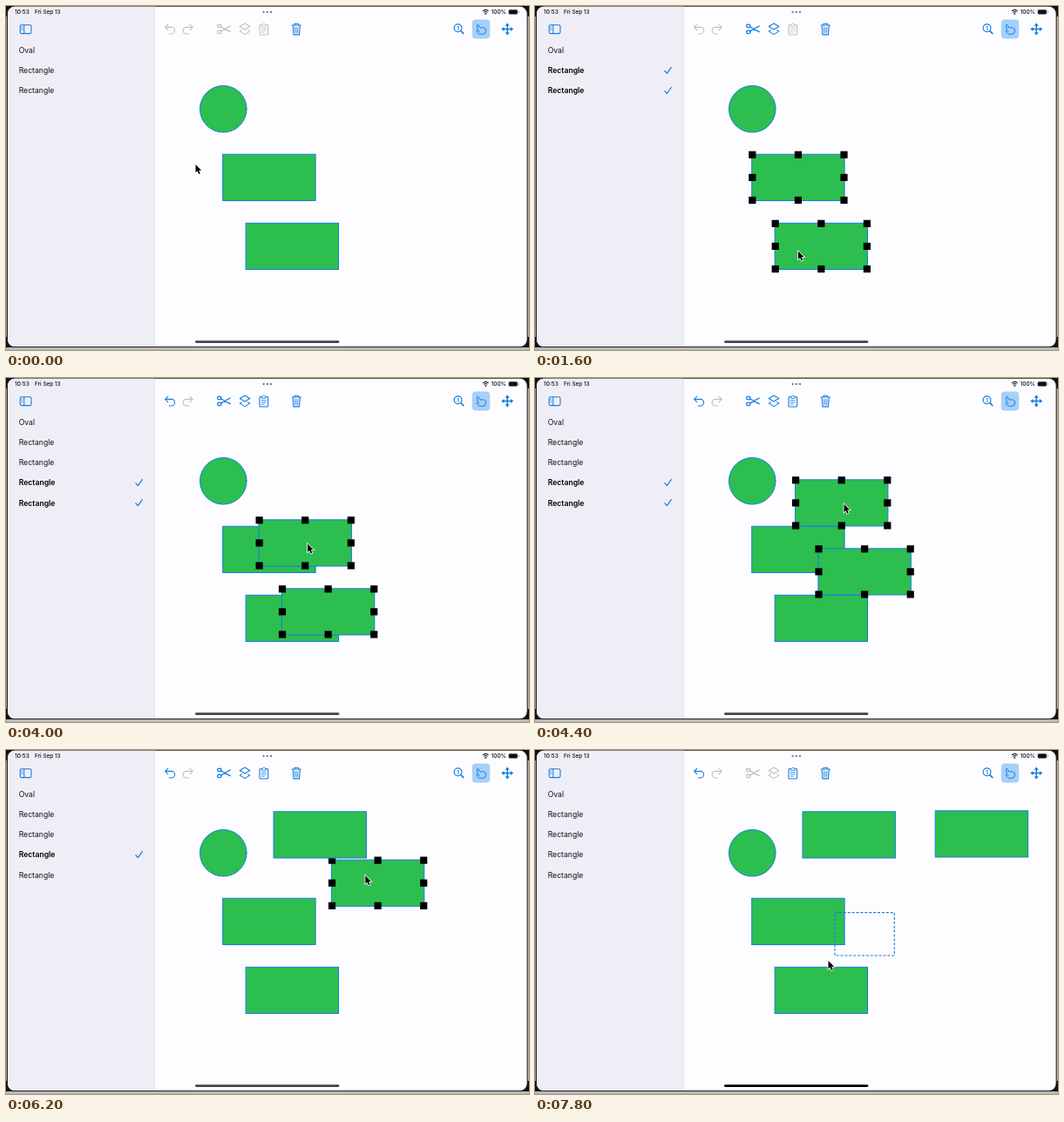
An HTML page with a canvas that plays this animation: 600 px wide and 395 px high, repeating every 8000 ms.

```html
<!DOCTYPE html>
<html lang="en">
<head>
<meta charset="utf-8">
<title>Shape editor</title>
<style>
html, body { margin: 0; width: 100%; height: 100%; overflow: hidden; background: #b9b9bb; }
canvas { display: block; width: 600px; height: 395px; }
</style>
</head>
<body>
<canvas id="stage"></canvas>
<script>
const W = 600, H = 395, LOOP = 8000, STEP = 200;
const BLUE = '#147de0', GREY = '#bfbfc4', GREEN = '#2dbe50', INK = '#111114';
const FONT = 'Inter, Roboto, sans-serif';
const canvas = document.getElementById('stage');
const ratio = window.devicePixelRatio || 1;
canvas.width = W * ratio;
canvas.height = H * ratio;
const c = canvas.getContext('2d');

// Moments at which the state switches
const FIRST = 600, SECOND = 1200, COPY = 2200, PASTE = 3200, SINGLE = 5800, CLEAR = 7200, MARQUEE = 7400;

// Tracks: time, x, y
const pointer = [
  [0, 217.5, 182], [600, 272, 195], [800, 272, 195], [1200, 302, 281.5], [1600, 302, 281.5],
  [2200, 275, 27], [2400, 275, 27], [2800, 287, 33], [3000, 296, 28], [3200, 296, 28],
  [3600, 310, 203], [4000, 346, 190.5], [4800, 363, 99], [5000, 363, 99], [5400, 376, 135.5],
  [5800, 372, 168], [6000, 372, 168], [6600, 493, 97], [6800, 498, 88], [7200, 415, 183],
  [7400, 412, 187], [7800, 336.5, 242]
];
const pairShift = [[3200, 5, 5], [3600, 5, 5], [4000, 41.3, -7.5], [4800, 58.3, -99.5]];
const soloShift = [[6000, 0, 0], [6600, 120, -71], [6800, 125.8, -80]];
const marqueeEnd = [[7400, 412, 187], [7800, 344, 236]];

function at(track, t) {
  if (t <= track[0][0]) return track[0].slice(1);
  for (let i = 1; i < track.length; i++) {
    const [t0, x0, y0] = track[i - 1], [t1, x1, y1] = track[i];
    if (t <= t1) {
      const k = (t - t0) / (t1 - t0);
      return [x0 + (x1 - x0) * k, y0 + (y1 - y0) * k];
    }
  }
  return track[track.length - 1].slice(1);
}

function line(d, color, width = 1.1) {
  c.strokeStyle = color;
  c.lineWidth = width;
  c.stroke(new Path2D(d));
}

function fill(d, color) {
  c.fillStyle = color;
  c.fill(new Path2D(d));
}

function pill(x, y, w, h, r, color) {
  c.beginPath();
  c.roundRect(x, y, w, h, r);
  c.fillStyle = color;
  c.fill();
}

function dot(x, y, r, color) {
  c.beginPath();
  c.arc(x, y, r, 0, 7);
  c.fillStyle = color;
  c.fill();
}

function text(s, x, y, size, weight, color = INK) {
  c.font = `${weight} ${size}px ${FONT}`;
  c.fillStyle = color;
  c.fillText(s, x, y);
}

function frame() {
  c.fillStyle = '#b9b9bb';
  c.fillRect(0, 0, W, H);
  c.fillStyle = '#111';
  for (const x of [0, 588]) for (const y of [0, 380]) c.fillRect(x, y, 12, 12);
  pill(0.8, 0, 597.9, 392, 9, '#222');
  c.beginPath();
  c.roundRect(2, 0.8, 595.6, 390.2, 8);
  c.clip();
  c.fillStyle = '#fdfcff';
  c.fillRect(0, 0, W, H);
  c.fillStyle = '#efeef7';
  c.fillRect(0, 0, 170, H);
  c.fillStyle = '#dcdbe2';
  c.fillRect(169.7, 0, 0.9, H);
}

function statusBar() {
  text('10:53', 10, 9.2, 6.5, 500);
  text('Fri Sep 13', 33, 9.2, 6.4, 500);
  text('100%', 556.5, 9.2, 6.5, 500);
  for (const x of [295.6, 299.8, 304]) dot(x, 7, 1.15, '#77777b');
  line('M547 5.8 Q550.3 3 553.6 5.8 M548.3 7.4 Q550.3 5.7 552.3 7.4', INK, 1.1);
  dot(550.3, 8.9, 0.9, INK);
  pill(576.3, 4, 11, 5.8, 1.8, '#98989c');
  pill(577, 4.6, 9.6, 4.6, 1.2, INK);
  pill(587.8, 6, 0.9, 2, 0.5, '#98989c');
}

function curvedArrow(color, mirror) {
  c.save();
  if (mirror) {
    c.translate(396.8, 0);
    c.scale(-1, 1);
  }
  line('M185.8 21.2 L182.6 24.4 L185.8 27.6 M182.8 24.4 H189.8 A3.8 3.8 0 0 1 189.8 32 H187.2', color);
  c.restore();
}

function scissors(color) {
  line('M246.7 24 L257.2 29.6 M246.7 28.8 L257.2 23', color, 1.4);
  c.lineWidth = 1.2;
  for (const y of [22.9, 29.9]) {
    c.beginPath();
    c.ellipse(244.8, y, 2.2, 1.8, 0, 0, 7);
    c.stroke();
  }
}

function layers(color) {
  line('M274 20 L279.8 23.5 L274 27 L268.2 23.5 Z M270.4 27.8 L268.2 29.1 L274 32.6 L279.8 29.1 L277.6 27.8', color);
}

function clipboard(color) {
  line('M293 21.5 H292 Q291 21.5 291 22.5 V32 Q291 33 292 33 H299.6 Q300.6 33 300.6 32 V22.5 Q300.6 21.5 299.6 21.5 H298.6', color);
  line('M293.4 22.9 V21.2 H294.6 Q295.8 18.6 297 21.2 H298.2 V22.9 Z', color, 0.9);
  line('M293.2 25.7 H298.4 M293.2 27.9 H298.4 M293.2 30.1 H296.4', color, 0.8);
}

function trash() {
  line('M328 22 H338.4 M331 21.8 V20.2 H335.4 V21.8 M329.2 22.4 L329.9 32.9 H336.5 L337.2 22.4', BLUE);
  line('M331.4 24.4 L331.7 30.8 M333.2 24.4 V30.8 M335 24.4 L334.7 30.8', BLUE, 0.75);
}

function moveIcon() {
  line('M575.2 21 V32 M569.6 26.5 H580.8', BLUE, 1.5);
  c.save();
  c.translate(575.2, 26.5);
  for (let i = 0; i < 4; i++) {
    fill('M0 -6.9 L2.6 -3.7 H-2.6 Z', BLUE);
    c.rotate(Math.PI / 2);
  }
  c.restore();
}

function toolbar(selected, copied, pasted) {
  const edit = selected ? BLUE : GREY;
  c.lineCap = c.lineJoin = 'round';
  c.beginPath();
  c.roundRect(16.2, 21.7, 12.8, 9.9, 1.6);
  c.strokeStyle = BLUE;
  c.lineWidth = 1.1;
  c.stroke();
  line('M20.8 21.8 V31.5', BLUE, 1);
  line('M17.9 24 H19.1 M17.9 25.8 H19.1 M17.9 27.6 H19.1', BLUE, 0.7);
  curvedArrow(pasted ? BLUE : GREY, false);
  curvedArrow(GREY, true);
  scissors(edit);
  layers(edit);
  clipboard(copied ? BLUE : GREY);
  trash();
  c.beginPath();
  c.arc(518.5, 25.3, 4.4, 0, 7);
  c.strokeStyle = BLUE;
  c.lineWidth = 1.2;
  c.stroke();
  line('M521.8 28.6 L524.8 31.6', BLUE, 1.5);
  text('1', 517.2, 27.5, 6, 700, BLUE);
  pill(534.8, 15.4, 20.4, 22.2, 4, '#a6d0fa');
  line('M541.2 27.2 L540.4 22.5 Q540.6 20.8 542 21.8 L544.2 25.3 Q545 24.2 546.2 25 Q547.4 24.2 548.4 25.2 Q550.2 25.2 550.6 28 Q550.8 32 547.2 32.4 H544.4 Q542.2 32.3 540.2 29.7 Q539.8 27.9 541.2 28.2 L543 29.1', BLUE, 1);
  moveIcon();
}

function list(rows) {
  rows.forEach(([name, on], i) => {
    const y = 51 + i * 23.1;
    text(name, 14.7, y + 3.1, 8.65, on ? 600 : 400, on ? '#000' : INK);
    if (on) line(`M148.9 ${y + 0.4} L151.4 ${y + 3.3} L156.3 ${y - 3.7}`, BLUE, 1.2);
  });
}

function box(x, y, on) {
  const w = 106.4, h = 53.2;
  c.fillStyle = GREEN;
  c.fillRect(x, y, w, h);
  c.strokeStyle = BLUE;
  c.lineWidth = 1;
  c.strokeRect(x, y, w, h);
  if (!on) return;
  c.fillStyle = '#000';
  for (let i = 0; i < 3; i++) {
    for (let j = 0; j < 3; j++) {
      if (i === 1 && j === 1) continue;
      c.fillRect(x + 0.6 + i * 52.6 - 4.1, y + 0.5 + j * 26.1 - 4.1, 8.2, 8.2);
    }
  }
}

function arrow([x, y]) {
  c.save();
  c.translate(x, y);
  const d = 'M0 0 V9.3 L2.1 7.4 L3.7 11 L5.3 10.3 L3.7 6.8 H6.7 Z';
  line(d, '#fff', 1.5);
  fill(d, '#000');
  c.restore();
}

function draw(t) {
  const pair = t < SINGLE;
  const pasted = t >= PASTE;
  const rects = [
    { x: 248.7, y: 170.3, on: t >= FIRST && !pasted },
    { x: 275.1, y: 249.3, on: t >= SECOND && !pasted }
  ];
  if (pasted) {
    const [dx, dy] = at(pairShift, t), [sx, sy] = at(soloShift, t);
    rects.push(
      { x: 275.1 + dx + sx, y: 249.3 + dy + sy, on: t < CLEAR },
      { x: 248.7 + dx, y: 170.3 + dy, on: pair }
    );
  }

  c.setTransform(ratio, 0, 0, ratio, 0, 0);
  c.save();
  frame();
  statusBar();
  toolbar(rects.some(r => r.on), t >= COPY, pasted);
  list([['Oval', false], ...rects.map(r => ['Rectangle', r.on])]);

  c.lineJoin = 'miter';
  dot(249.3, 118.3, 26.8, GREEN);
  c.strokeStyle = BLUE;
  c.lineWidth = 1;
  c.stroke();
  for (const r of rects) box(r.x, r.y, r.on);

  if (t > MARQUEE) {
    const [x, y] = at(marqueeEnd, t);
    c.lineCap = 'butt';
    c.setLineDash([3, 1.9]);
    c.strokeStyle = BLUE;
    c.lineWidth = 1.2;
    c.strokeRect(x, 186.7, 412.3 - x, y - 186.7);
    c.setLineDash([]);
  }
  pill(217, 384.2, 165.4, 2.8, 1.4, t >= MARQUEE ? '#000' : '#454547');
  arrow(at(pointer, t));
  c.restore();
}

function tick() {
  const t = performance.now() % LOOP;
  draw(Math.floor(t / STEP) * STEP);
  requestAnimationFrame(tick);
}
tick();
</script>
</body>
</html>
```
